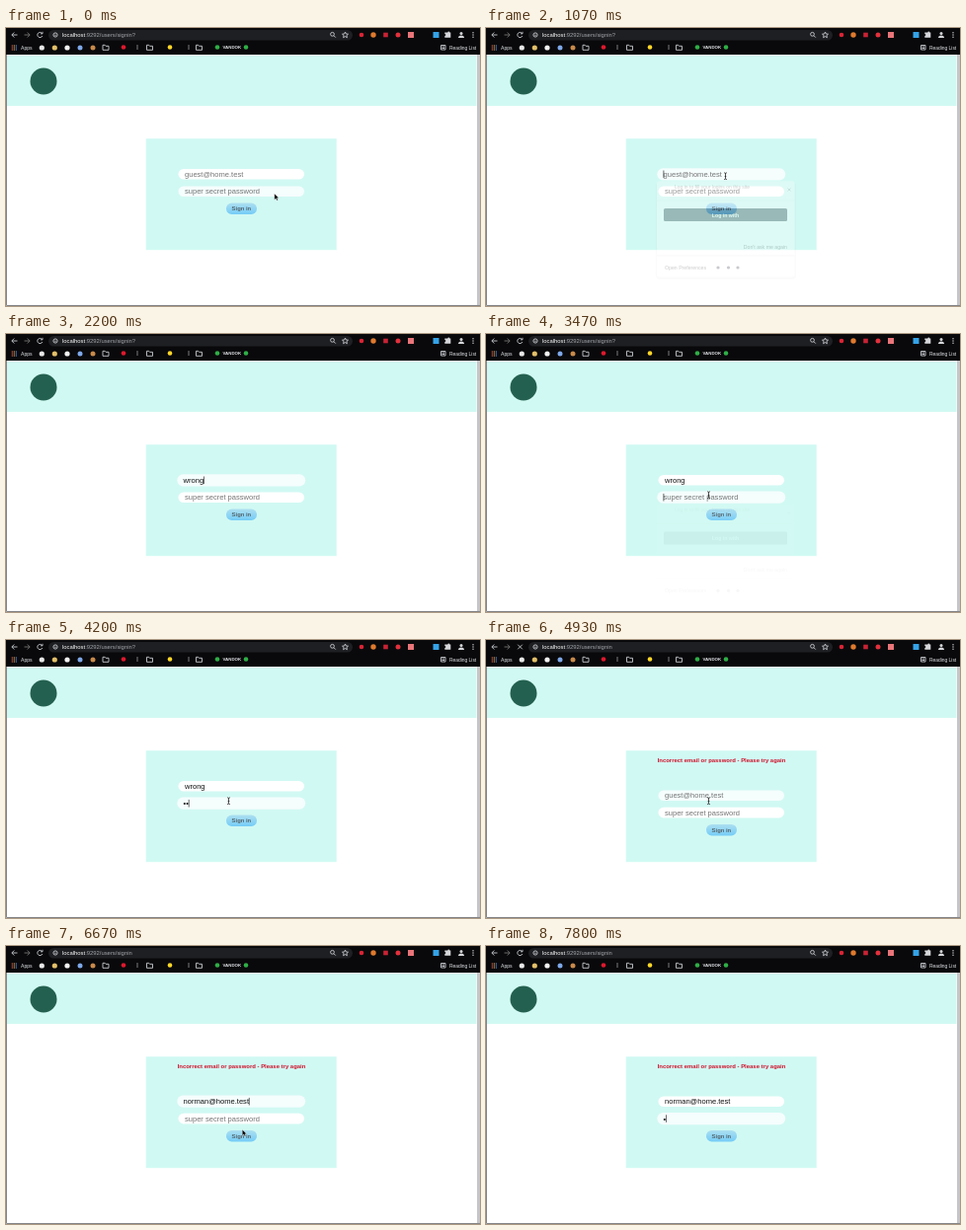
These frames come from a looping animation (480x282 px, 8 s). An HTML page:

```html
<!DOCTYPE html>
<html lang="en">
<head>
<meta charset="utf-8">
<title>Sign in</title>
<style>
  html, body { margin: 0; width: 100%; height: 100%; overflow: hidden; background: #fff; }
  svg { display: block; width: 100vw; height: 100vh; }
  text { font-family: "Liberation Sans", Arial, sans-serif; white-space: pre; }
  .bar { font-size: 5.1px; fill: #e4e6e9; }
  .field { font-size: 7.55px; }
  .line { fill: none; stroke: #c9ccd1; stroke-width: .9; }
</style>
</head>
<body>
<svg id="stage" viewBox="0 0 480 282">
  <defs>
    <linearGradient id="blue" x1="0" y1="0" x2="0" y2="1">
      <stop offset="0" stop-color="#addff0"/>
      <stop offset="1" stop-color="#74ccf7"/>
    </linearGradient>
    <path id="folder" d="M-3 -2.5h2.2l.8 1h3v4h-6z" class="line"/>
  </defs>

  <rect width="480" height="282" fill="#fff"/>
  <rect x="477" y="27" width="3" height="255" fill="#c6c6c9"/>
  <rect y="27.5" width="476.5" height="51.5" fill="#d1f9f3"/>
  <circle cx="38" cy="54" r="13.5" fill="#24604f"/>
  <rect x="141.7" y="112.2" width="193" height="113" fill="#d1f9f3"/>

  <g id="chrome">
    <rect width="480" height="27" fill="#09090b"/>
    <rect x="43" y="2" width="308" height="10.5" rx="5.2" fill="#1e1f22"/>
    <path class="line" d="M11.5 7H6M8.3 4.5L5.8 7l2.5 2.5"/>
    <path class="line" style="stroke:#777" d="M18.5 7H24M21.7 4.5L24.2 7l-2.5 2.5"/>
    <path id="reload" class="line" d="M36.6 5.6A2.6 2.6 0 1 0 36.8 8M37 3.8v2h-2"/>
    <path id="stop" class="line" d="M32.2 4.7l4.6 4.6M36.8 4.7l-4.6 4.6"/>
    <circle cx="50" cy="7" r="2.1" class="line"/><path class="line" d="M50 6.6v1.4"/>
    <text x="57" y="9" font-size="5.87" fill="#a3a7ad"><tspan fill="#fff">localhost</tspan>:9292/users/signin<tspan id="query">?</tspan></text>
    <circle cx="330.5" cy="6.3" r="1.9" class="line"/><path class="line" d="M332 7.8l1.8 1.8"/>
    <path class="line" d="M343.5 4l.9 2 2.1.2-1.6 1.4.5 2.1-1.900-1.100-1.900 1.100.5-2.100-1.600-1.400 2.100-.2z"/>
    <path d="M446 4.5h1.3a1 1 0 0 1 2 0h1v5.2h-6v-1.6a1 1 0 0 0 0-2v-1.6z" fill="#d5d7da"/>
    <circle cx="461" cy="5.6" r="1.5" fill="#d5d7da"/><path d="M458 10q0-2.5 3-2.5t3 2.5z" fill="#d5d7da"/>
    <g id="icons"></g>
    <text class="bar" x="15" y="21.7">Apps</text>
    <text class="bar" x="219.5" y="21.4" font-weight="bold" style="font-size:4.4px">VANDOK</text>
    <text class="bar" x="449" y="21.7" style="font-size:4.9px">Reading List</text>
    <path class="line" d="M440.5 17.5h4.5v4.500h-4.500zM441.500 19h2.500M441.500 20.500h2.500"/>
    <path class="line" style="stroke-width:.6" d="M133 17v5M185 17v5"/>
    <use href="#folder" x="101" y="19.8"/><use href="#folder" x="145.5" y="19.8"/><use href="#folder" x="195.5" y="19.8"/>
  </g>

  <path d="M.5 27V281.5H480" fill="none" stroke="#85878a"/>

  <text id="error" x="238.5" y="123.8" text-anchor="middle" font-size="5.95" font-weight="bold" fill="#d0102a">Incorrect email or password - Please try again</text>

  <g id="form">
    <g id="email"><rect/><text class="field"/><path stroke="#000" stroke-width=".6"/></g>
    <g id="pass"><rect/><text class="field"/><path stroke="#000" stroke-width=".6"/></g>
    <rect x="223" y="177.5" width="31" height="11.5" rx="5.6" fill="url(#blue)"/>
    <text x="238.4" y="185.2" text-anchor="middle" font-size="5.9" font-weight="bold" fill="#55686f">Sign in</text>
  </g>

  <g id="popup">
    <rect x="172" y="156" width="142" height="99" rx="4" fill="#000" opacity=".06"/>
    <rect x="173" y="155.5" width="139.500" height="97" rx="2" fill="#fff"/>
    <text x="191" y="163" font-size="5" fill="#666">Log in to fill your logins on this site</text>
    <path d="M305.500 162.500l3 3M308.500 162.500l-3 3" stroke="#888" stroke-width=".7"/>
    <path d="M173 175H312.500M173 231H312.500" stroke="#e3e8ea" stroke-width=".7"/>
    <rect x="180" y="183" width="125" height="13" rx="1.5" fill="#0b1a26"/>
    <text x="242.5" y="191.500" text-anchor="middle" font-size="5.2" font-weight="bold" fill="#fff">Log in with</text>
    <text x="305" y="223.5" text-anchor="end" font-size="5.2" fill="#555">Don't ask me again</text>
    <text x="181" y="244.8" font-size="5.2" fill="#555">Open Preferences</text>
    <g fill="#445"><circle cx="235" cy="243" r="1.6"/><circle cx="245.5" cy="243" r="1.6"/><circle cx="255" cy="243" r="1.6"/></g>
  </g>

  <path id="arrow" d="M0 0v6.2l1.5-1.3 1 2.2 1.1-.5-1-2.1h1.9z" fill="#000" stroke="#fff" stroke-width=".4"/>
  <path id="beam" d="M-1.3-3.2q1.3 0 1.3 1v4.8q0 1-1.3 1M1.3-3.2q-1.3 0-1.3 1M0 2.600q0 1 1.300 1M-.8.5h1.600" fill="none" stroke="#222" stroke-width=".8"/>
</svg>
<script>
const LOOP = 8000;
const ACTIVE = '#f5fdfd';
const $ = id => document.getElementById(id);
const show = (el, on) => el.setAttribute('visibility', on ? 'visible' : 'hidden');
const move = (el, x, y) => el.setAttribute('transform', `translate(${x} ${y})`);
const set = (el, attrs) => { for (const k in attrs) el.setAttribute(k, attrs[k]); };
const ramp = (t, a, b) => Math.max(0, Math.min(1, (t - a) / (b - a)));
const countSince = (t, times) => times.filter(s => t >= s).length;

// Toolbar and bookmark icons: x, y, radius, colour
const dots = [
  [36.3, 20, 2.6, '#e8e8e8'], [49.3, 20, 2.6, '#e3c069'], [62, 20, 2.6, '#f3f3f3'],
  [75, 20, 2.5, '#7fa9ea'], [88, 20, 2.5, '#c98a4a'],
  [119, 19.5, 2.3, '#e0182d'], [166, 19.5, 2.3, '#ffd829'],
  [214, 19.5, 2.3, '#2fae47'], [243, 19.5, 2.3, '#2fae47'],
  [360, 7, 2.3, '#d92436'], [372, 7, 2.7, '#e07a2c'], [397, 7, 2.5, '#e2313d']
];
// Square icons: x, y, half side, colour
const squares = [[384.500, 7, 2.300, '#c92334'], [410, 7, 3, '#e9757a'], [435.500, 7, 3, '#35a3e8']];
const gridHues = ['#e05548', '#d9a441', '#4a8df0'];
for (let r = 0; r < 3; r++) {
  dots.push([473, 4.8 + r * 2.2, .7, '#d5d7da']);
  for (let c = 0; c < 3; c++) dots.push([6.3 + c * 2, 18 + r * 2, .7, gridHues[c]]);
}
$('icons').innerHTML =
  dots.map(([x, y, r, c]) => `<circle cx="${x}" cy="${y}" r="${r}" fill="${c}"/>`).join('') +
  squares.map(([x, y, h, c]) =>
    `<rect x="${x - h}" y="${y - h}" width="${2 * h}" height="${2 * h}" fill="${c}"/>`).join('');

// Pointer: time, x, y, shape
const path = [
  [0, 271.8, 168, 'arrow'], [60, 271.8, 168, 'arrow'], [240, 259, 162, 'beam'],
  [530, 242.5, 153, 'beam'], [660, 242.5, 153, 'beam'], [730, 242.5, 150, 'beam'],
  [1470, 242.5, 150, ''], [2600, 242.5, 150, 'beam'], [2730, 240, 141, 'arrow'],
  [2930, 231, 178, 'arrow'], [3070, 226, 167, 'beam'], [3200, 225.5, 163, 'beam'],
  [5270, 225.5, 163, 'beam'], [5530, 236, 178.8, 'beam'], [5660, 236, 178.8, 'beam'],
  [5800, 238, 169, 'beam'], [6000, 241, 158, 'beam'], [6270, 241, 158, ''],
  [6660, 239, 188, 'arrow'], [6740, 241, 175, 'beam'], [7060, 241, 175, 'beam'],
  [7130, 242, 174.5, 'beam'], [7330, 242, 174.5, '']
];

function pointerAt(t) {
  const i = path.findLastIndex(p => t >= p[0]);
  const [t0, x0, y0, shape] = path[i];
  const [t1, x1, y1] = path[i + 1] || [LOOP, x0, y0];
  const k = ramp(t, t0, t1);
  return { x: x0 + (x1 - x0) * k, y: y0 + (y1 - y0) * k, shape };
}

function drawField(id, cy, value, hint, focused, hover) {
  const [box, text, caret] = $(id).children;
  const grow = focused ? 1.2 : 0;
  const x = focused ? 179.6 : 181;
  set(box, {
    x: 174.5 - grow, y: cy - 5.3 - grow * .7,
    width: 127.5 + grow * 2, height: 10.6 + grow * 1.4,
    rx: 5.3 + grow * .7, fill: focused || hover ? ACTIVE : '#fff'
  });
  text.textContent = value || hint;
  set(text, { x, y: cy + 2.5, fill: value ? '#111' : '#757575' });
  const end = x + .3 + (value ? text.getComputedTextLength() : 0);
  caret.setAttribute('d', `M${end} ${cy - 3.8}v7.6`);
  show(caret, focused);
}

function popupAlpha(t) {
  if (t >= 1070 && t < 1530) return (.28 + .72 * ramp(t, 1070, 1330)) * (1 - ramp(t, 1410, 1530));
  if (t >= 3470 && t < 3930) return .03 + .97 * ramp(t, 3470, 3730);
  return 0;
}

function draw(t) {
  const retry = t >= 4930;
  const shift = retry ? 9.4 : 0;
  const p = pointerAt(t);

  show($('error'), retry);
  $('query').textContent = retry ? '' : '?';
  const loading = t >= 4800 && t < 5130;
  show($('stop'), loading);
  show($('reload'), !loading);

  const typed = 'wrong'.slice(0, countSince(t, [1470, 1730, 1870, 2070, 2200]));
  const filled = t >= 6400 ? 'norman@home.test' : t >= 6270 ? 'n' : '';
  const keys = countSince(t, retry ? [7730] : [4070, 4200, 4330, 4470, 4600]);
  const onEmail = retry ? t >= 6070 && t < 6870 : t >= 870 && t < 3270;
  const onPass = retry ? t >= 6870 : t >= 3270;
  const over = cy => p.shape && p.x > 174 && p.x < 302 && Math.abs(p.y - shift - cy) < 5.5;

  move($('form'), 0, shift);
  drawField('email', 148.3, retry ? filled : typed, 'guest@home.test', onEmail, over(148.3));
  drawField('pass', 165.7, '•'.repeat(keys), 'super secret password', onPass, over(165.7));

  const popup = $('popup');
  popup.setAttribute('opacity', popupAlpha(t));
  move(popup, 0, t > 3000 ? 17.4 : 0);

  for (const shape of ['arrow', 'beam']) {
    show($(shape), p.shape === shape);
    move($(shape), p.x, p.y);
  }
}

const start = performance.now();
function tick() {
  draw((performance.now() - start) % LOOP);
  requestAnimationFrame(tick);
}
tick();
</script>
</body>
</html>
```
